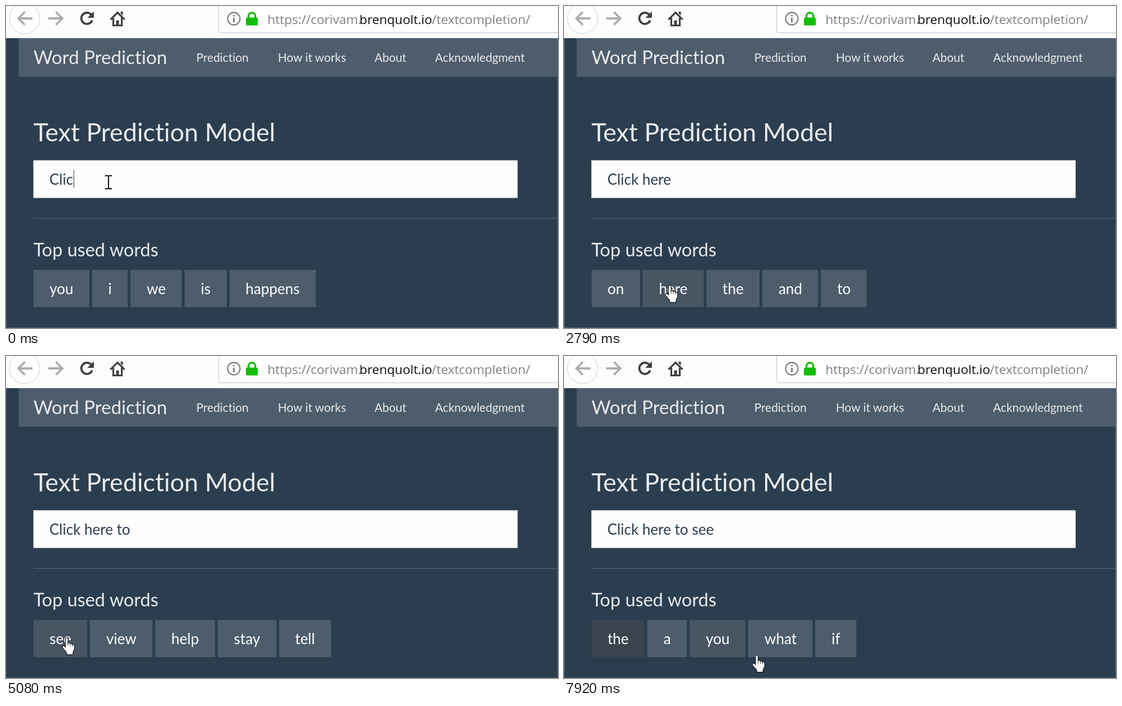
Recreate the animation shown at these times as an HTML page. Size 980x571 px, loop 8000 ms.

```html
<!DOCTYPE html>
<html lang="en">
<head>
<meta charset="utf-8">
<title>Word Prediction</title>
<style>
  html, body { margin: 0; width: 100%; height: 100%; overflow: hidden; background: #2b3e50; }
  svg, #words { position: absolute; left: 0; top: 0; }
  svg, #words { font-family: Lato, sans-serif; font-variant-ligatures: none; fill: #ebebeb; }
  #words { left: 48.7px; top: 468px; display: flex; gap: 5px; }
  #words span {
    height: 66px; padding: 0 28.5px; background: #4e5d6c;
    color: #fff; font-size: 26px; line-height: 66px;
  }
  #words .focus { background: #39444e; }
  #words .hover { background: #485563; }
  #words .press { background: #283037; box-shadow: inset 0 3px 5px rgba(0, 0, 0, .125); }
  .line { fill: none; stroke: #404040; stroke-width: 3.8; }
  .nav { font-size: 20.8px; }
  .url { font: 22.5px "Open Sans", sans-serif; fill: #808080; }
</style>
</head>
<body>
<svg width="980" height="571">
  <!-- browser bar -->
  <rect width="980" height="57" fill="#fdfdfd"/>
  <circle cx="33" cy="22" r="27" fill="#fff" stroke="#cfcfcf"/>
  <g class="line" style="stroke:#adadad">
    <path d="M47 22H22M33.5 10.5L22 22L33.5 33.5"/>
    <path d="M75 22H100M88.5 10.5L100 22L88.5 33.5"/>
  </g>
  <path class="line" d="M151.5 15.5A10 10 0 1 0 153 25.5"/>
  <path d="M156 9.5V21H144.5Z" fill="#404040"/>
  <path class="line" style="stroke-width:3.2" d="M185.5 24L198 11.5L210.5 24M190.5 21V34.5H205.5V21"/>
  <path d="M195.5 25.5h5v9h-5zM203.5 10h4v7l-4-4z" fill="#404040"/>
  <path d="M377.5-2V44q0 3.5 3.5 3.5H982V-2Z" fill="#fff" stroke="#c2c2c2"/>
  <circle cx="404.5" cy="22.5" r="11" fill="none" stroke="#6a6a6a" stroke-width="1.8"/>
  <path d="M403.2 16h2.6v2.6h-2.6zM403.2 21h2.6v8h-2.6z" fill="#6a6a6a"/>
  <rect x="426" y="20.5" width="21" height="14" rx="2" fill="#12bc00"/>
  <path d="M430.5 22v-5a6 5 0 0 1 12 0v5" fill="none" stroke="#12bc00" stroke-width="3.4"/>
  <g class="url">
    <text x="464.3" y="32">https://corivam.</text>
    <text x="627.6" y="32" fill="#0c0c0d">brenquolt.io</text>
    <text x="756" y="32">/textcompletion/</text>
  </g>
  <!-- page -->
  <rect x="22.5" y="57" width="958" height="68.5" fill="#4e5d6c"/>
  <text x="48.7" y="103" font-size="33.1">Word Prediction</text>
  <g class="nav">
    <text x="337.8" y="98.5">Prediction</text>
    <text x="482.8" y="98.5">How it works</text>
    <text x="654.3" y="98.5">About</text>
    <text x="761.8" y="98.5">Acknowledgment</text>
  </g>
  <text x="48.7" y="240" font-size="44.6">Text Prediction Model</text>
  <rect x="48.6" y="273.6" width="859.7" height="66.8" fill="#fefefe"/>
  <text id="typed" x="77" y="317" font-size="26" fill="#2b3e50"></text>
  <rect id="caret" y="291" width="1" height="31" fill="#2b3e50"/>
  <rect x="49" y="376" width="931" height="1" fill="#566573"/>
  <text x="48.7" y="444" font-size="32.4">Top used words</text>
  <path d="M.5 57V570.5H979.5V57" fill="none" stroke="#566471"/>
</svg>
<div id="words"></div>
<svg width="980" height="571">
  <g id="beam" fill="none" stroke="#111" stroke-width="2">
    <path d="M-6-11H-2Q0-11 0-9Q0-11 2-11H6M0-10V11M-6 12H-2Q0 12 0 10Q0 12 2 12H6"/>
  </g>
  <path id="arrow" d="M0 0V23L5 18L9 27L13 25L9 17H16Z" fill="#fff" stroke="#111"/>
  <g id="hand">
    <g transform="translate(-1 -1) scale(1.08)" stroke="#151a20" stroke-width="1.1">
      <path fill="#fff" d="M6 2.5Q8-.5 10.2 2.5V10.5Q12.5 9 14 11.5Q16.5 10 17.7 12.7Q21 12 21 15.5V20L18.5 25V29.3H8V26L1.5 18.5Q0 14.5 3.5 14.5L6 17Z"/>
      <path fill="none" stroke-width=".8" d="M10.2 10V15M14 11.5V15.5M17.7 12.7V16"/>
    </g>
    <g id="ring" fill="none">
      <circle cx="9" cy="1" r="9.5" stroke="#14191d" stroke-width="2.5"/>
      <circle cx="9" cy="1" r="9" stroke="#d5d5d5"/>
    </g>
  </g>
</svg>
<script>
const LOOP = 8000;
const $ = id => document.getElementById(id);

// Each step changes part of the state: [time, changes]
const steps = [
  [0, { text: "Clic", caret: 120, words: "you i we is happens", cursor: "beam", x: 182, y: 312,
        hover: -1, focus: -1, press: -1, ring: false }],
  [250, { text: "Click", caret: 133 }],
  [370, { caret: 138 }],
  [750, { caret: 0 }],
  [1140, { words: "on here the and to" }],
  [1260, { caret: 138 }],
  [1630, { caret: 0, cursor: "arrow", x: 180, y: 395 }],
  [1760, { cursor: "hand", x: 173, y: 472, hover: 1 }],
  [1880, { x: 175, y: 488 }],
  [2020, { x: 180, y: 495 }],
  [2270, { press: 1, focus: 1, ring: true }],
  [2400, { ring: false }],
  [2520, { press: -1 }],
  [2790, { text: "Click here" }],
  [3190, { words: "to for in is and" }],
  [3590, { x: 160, y: 499 }],
  [3740, { x: 100, hover: 0 }],
  [4140, { press: 0, focus: 0, ring: true }],
  [4390, { press: -1, ring: false }],
  [4680, { text: "Click here to" }],
  [5080, { words: "see view help stay tell" }],
  [6410, { press: 0, ring: true }],
  [6560, { ring: false, press: -1 }],
  [6810, { text: "Click here to see" }],
  [7330, { words: "the a you what if" }],
  [7920, { x: 334.5, y: 530, hover: 2 }]
];

const show = (id, on) => $(id).setAttribute("visibility", on ? "visible" : "hidden");

function render(s) {
  $("typed").textContent = s.text;
  $("caret").setAttribute("x", s.caret);
  show("caret", s.caret);
  for (const id of ["beam", "arrow", "hand"]) {
    show(id, id === s.cursor);
    $(id).setAttribute("transform", `translate(${s.x} ${s.y})`);
  }
  show("ring", s.ring);
  $("words").replaceChildren(...s.words.split(" ").map((word, i) => {
    const button = document.createElement("span");
    button.textContent = word;
    button.className = ["press", "hover", "focus"].find(k => s[k] === i) || "";
    return button;
  }));
}

let shown = 0;
function tick() {
  const t = performance.now() % LOOP;
  const past = steps.filter(([at]) => at <= t);
  if (past.length !== shown) {
    shown = past.length;
    render(Object.assign({}, ...past.map(([, change]) => change)));
  }
  requestAnimationFrame(tick);
}
tick();
</script>
</body>
</html>
```
